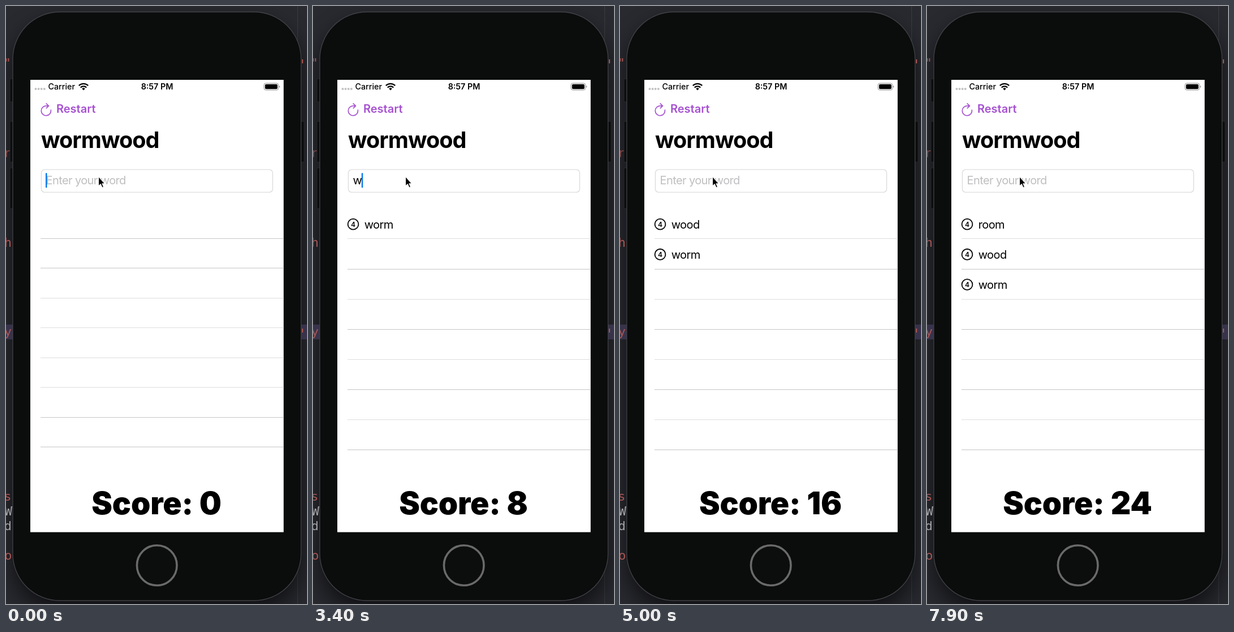
Write an HTML page that moves like this. It is 532 px wide and 1053 px high and loops after 8000 ms.

```html
<!DOCTYPE html>
<html lang="en">
<head>
<meta charset="utf-8">
<title>Word game</title>
<style>
  html, body { margin: 0; width: 100%; height: 100%; overflow: hidden; background: #292a30; }
  svg { display: block; width: 532px; height: 1053px; }
  text { font-family: Inter, sans-serif; font-optical-sizing: none; white-space: pre; }
  .code text { font: 22px "DejaVu Sans Mono", monospace; fill: #a85654; text-anchor: end; }
  .status { font-size: 14.3px; }
  .body { font-size: 20px; letter-spacing: -.6px; }
  .restart { font-size: 20px; font-weight: 600; fill: #a651d1; }
  .title { font-size: 39.5px; font-weight: 700; letter-spacing: -.95px; }
  .score { font-size: 55px; font-weight: 900; letter-spacing: -.1px; text-anchor: middle; }
  .badge { font-size: 12px; font-weight: 600; text-anchor: middle; }
</style>
</head>
<body>
<svg viewBox="0 0 532 1053">
  <defs>
    <clipPath id="listClip"><rect x="43" y="340" width="448" height="488"/></clipPath>
    <clipPath id="newRowClip"><rect id="reveal" x="43" y="357" width="448" height="0"/></clipPath>
    <filter id="blur" x="-20%" y="-20%" width="140%" height="140%"><feGaussianBlur stdDeviation="20"/></filter>
  </defs>

  <!-- editor behind the phone -->
  <rect width="532" height="1053" fill="#292a30"/>
  <path d="M515.5 0V1053" stroke="#3c3d42"/>
  <rect x="12" y="30" width="509.5" height="1037" rx="83" opacity=".6" filter="url(#blur)"/>
  <rect y="561" width="532" height="26" fill="#38334b"/>
  <g class="code">
    <text x="9" y="108">"</text>
    <text x="9" y="266" opacity=".7">r</text>
    <text x="10" y="424">h</text>
    <text x="10" y="581">y</text>
    <text x="9.5" y="871">s</text>
    <text x="11" y="897" style="fill:#a3a3a6">W</text>
    <text x="10" y="923" style="fill:#a3a3a6">d</text>
    <text x="10.5" y="975">o</text>
    <path d="M524 94v7M524 568v7" stroke="#a85654" stroke-width="2"/>
  </g>

  <!-- phone -->
  <g fill="#0c0d0d" stroke="#292a2c">
    <rect x="7" y="128" width="10" height="41" rx="2"/>
    <rect x="7" y="203" width="10" height="72" rx="2"/>
    <rect x="7" y="285" width="10" height="72" rx="2"/>
    <rect x="516" y="203" width="11" height="72" rx="2"/>
    <rect x="12" y="10.5" width="509.5" height="1036.5" rx="83" fill="#0b0c0c" stroke="#414246" stroke-width="1.3"/>
  </g>
  <circle cx="266.7" cy="985" r="35.3" fill="#0c0d0d" stroke="#6a6a6a" stroke-width="3.6"/>
  <rect x="43" y="130" width="447.7" height="796.5" fill="#fff"/>

  <!-- status bar -->
  <g fill="#c2c2c4">
    <circle cx="52.5" cy="146" r="2"/><circle cx="57.6" cy="146" r="2"/>
    <circle cx="62.7" cy="146" r="2"/><circle cx="67.8" cy="146" r="2"/>
  </g>
  <text class="status" x="74.5" y="147" font-weight="500">Carrier</text>
  <g fill="none" stroke="#000" stroke-width="2.3">
    <path d="M128.8 140.2a11.7 11.7 0 0 1 16.4 0M131.8 143.6a7.4 7.4 0 0 1 10.4 0"/>
    <path d="M134.2 145.6a4 4 0 0 1 5.6 0L137 148.6z" fill="#000" stroke="none"/>
  </g>
  <text class="status" x="267" y="147" font-weight="600" text-anchor="middle">8:57 PM</text>
  <rect x="456" y="136" width="25.6" height="12" rx="3.4" fill="none" stroke="#8f8f8f"/>
  <rect x="457.8" y="137.8" width="22" height="8.4" rx="2"/>
  <path d="M482.8 140v4a2.1 2.1 0 0 0 0-4z" fill="#8f8f8f"/>

  <!-- header and field -->
  <path d="M79.4 183.2A8.6 8.6 0 1 1 70.8 175.8H75M71.2 171.8L75.4 175.8L71.4 179.9"
        fill="none" stroke="#a651d1" stroke-width="1.7" stroke-linecap="round" stroke-linejoin="round"/>
  <text class="restart" x="89" y="188">Restart</text>
  <text class="title" x="62" y="250">wormwood</text>
  <rect x="62.4" y="288" width="409" height="40" rx="6" fill="#fff" stroke="#d6d6d8" stroke-width="1.1"/>
  <text class="body" id="field" x="70.5" y="314"></text>
  <rect id="caret" x="70" y="294" width="2.5" height="26" rx="1" fill="#0a7aef"/>

  <g id="list" clip-path="url(#listClip)"></g>
  <text class="score" id="score" x="266" y="894.5"></text>

  <path d="M163.5 300.5V317L167.3 313.6L170 319.8L172.6 318.7L170 312.7H174.6Z"
        fill="#000" stroke="#fff" stroke-width="1.1" stroke-linejoin="round"/>
</svg>

<script>
const LOOP = 8000, LIST_TOP = 356.8, PITCH = 53.1, EMPTY_PITCH = 52.5, INSERT_MS = 300;

// Field states: null means unfocused, a string means focused with that text.
const fieldStates = [
  [-300, ''], [500, 'w'], [700, 'wo'], [800, 'wor'], [1000, 'worm'], [1800, null],
  [2400, ''], [3100, 'w'], [3500, 'wo'], [3700, 'woo'], [3900, 'wood'], [4245, null],
  [6300, ''], [6500, 'r'], [6650, 'ro'], [6800, 'roo'], [7000, 'room'], [7180, null]
];
const submissions = [[1800, 'worm'], [4245, 'wood'], [7180, 'room']];

const el = id => document.getElementById(id);
const [field, caret, list, score, reveal] = ['field', 'caret', 'list', 'score', 'reveal'].map(el);
const smooth = p => p * p * (3 - 2 * p);

function caretOpacity(age) {
  const phase = age % 1000;
  return phase < 400 || phase >= 700 ? 1 : phase < 500 ? 0.5 : 0;
}

function drawField(t) {
  const [since, text] = fieldStates.filter(s => s[0] <= t).pop();
  field.textContent = text || 'Enter your word';
  field.setAttribute('fill', text ? '#000' : '#bfbfc1');
  caret.setAttribute('opacity', text === null ? 0 : caretOpacity(t - since));
  caret.setAttribute('x', text ? 70 + field.getComputedTextLength() : 70);
}

function rowMarkup(word, y, attrs = '') {
  return `<g ${attrs}>
    <circle cx="71" cy="${y + 27.5}" r="9.4" fill="none" stroke="#000" stroke-width="1.8"/>
    <text class="badge" x="71" y="${y + 31.9}">${word.length}</text>
    <text class="body" x="90.7" y="${y + 34.7}">${word}</text></g>`;
}

function lineMarkup(y, color) {
  return `<rect x="61" y="${Math.floor(y)}" width="429.7" height="1" fill="${color}"/>`;
}

function drawList(t) {
  const done = submissions.filter(s => s[0] <= t).reverse();
  const progress = done.length ? smooth(Math.min(1, (t - done[0][0]) / INSERT_MS)) : 1;
  const shift = (progress - 1) * PITCH;
  const pitch = done.length ? PITCH : EMPTY_PITCH;
  reveal.setAttribute('height', progress * PITCH);

  let markup = '';
  done.forEach(([, word], i) => {
    markup += i ? rowMarkup(word, LIST_TOP + i * PITCH + shift)
                : rowMarkup(word, LIST_TOP, 'clip-path="url(#newRowClip)"');
  });
  for (let k = progress < 1 ? 2 : 1; k <= 9; k++) {
    const light = done.length ? k % 2 : k > 2 && k < 7;
    markup += lineMarkup(LIST_TOP + k * pitch + shift, light ? '#dededf' : '#c6c6c8');
  }
  list.innerHTML = markup;
  score.textContent = 'Score: ' + done.reduce((sum, [, word]) => sum + word.length * 2, 0);
}

function frame() {
  const t = performance.now() % LOOP;
  drawField(t);
  drawList(t);
  requestAnimationFrame(frame);
}
frame();
</script>
</body>
</html>
```
